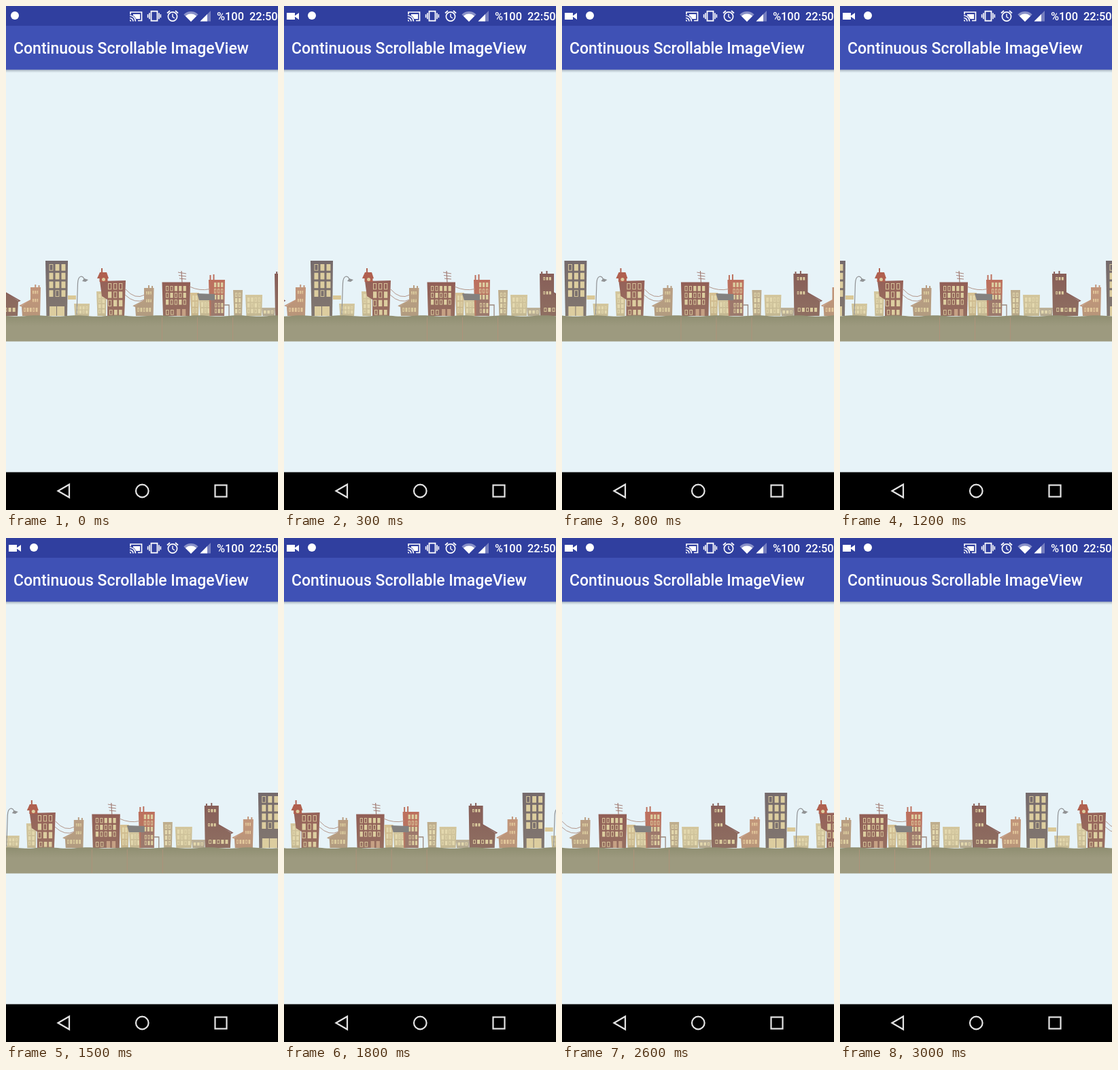
An HTML page with a canvas that plays this animation: 400 px wide and 740 px high, repeating every 3100 ms.

```html
<!DOCTYPE html>
<html lang="en">
<head>
<meta charset="utf-8">
<title>Continuous scroll</title>
<style>
html, body { margin: 0; width: 100%; height: 100%; overflow: hidden; background: #e7f3f8; }
canvas { display: block; }
</style>
</head>
<body>
<canvas id="stage" width="400" height="740"></canvas>
<script>
const ctx = document.getElementById('stage').getContext('2d');
const LOOP = 3100, STEP = 100, PERIOD = 416;
const STREET = 455;
const SKY = '#e7f3f8', CREAM = '#dccd9f', PALE = '#d4c79e', WIRE = '#b3978b', STEEL = '#909294';

// Scroll distance in pixels at a few times in ms; the speed is even in between
const SCROLL = [[0, 0], [300, 19], [1200, 83], [2300, 157], [3000, 201]];

function scrollAt(t) {
  const i = Math.max(1, SCROLL.findIndex(([time]) => time >= t));
  const [t0, d0] = SCROLL[i - 1], [t1, d1] = SCROLL[i];
  return d0 + (d1 - d0) * (t - t0) / (t1 - t0);
}

function rect(x, y, w, h, color) {
  ctx.fillStyle = color;
  ctx.fillRect(x, y, w, h);
}

function trace(...points) {
  ctx.beginPath();
  for (const [x, y] of points) ctx.lineTo(x, y);
}

function fill(color) {
  ctx.fillStyle = color;
  ctx.fill();
}

function stroke(color, width = 1) {
  ctx.strokeStyle = color;
  ctx.lineWidth = width;
  ctx.stroke();
}

function arc(x, y, r, from = 0, to = Math.PI * 2) {
  ctx.beginPath();
  ctx.arc(x, y, r, from, to);
}

function fade(y0, y1, color0, color1) {
  const gradient = ctx.createLinearGradient(0, y0, 0, y1);
  gradient.addColorStop(0, color0);
  gradient.addColorStop(1, color1);
  return gradient;
}

// Fills the current path and lets it pale towards the street
function wall(color, top) {
  fill(color);
  fill(fade(top, STREET, 'rgba(160,150,120,0)', 'rgba(160,150,120,.3)'));
}

// An even grid of windows, some lit and some only outlined
function panes(x, y, w, h, cols, rows, color = CREAM, seed = x) {
  const dx = w / cols, dy = h / rows, pw = dx * 0.66, ph = dy * 0.76;
  ctx.strokeStyle = color;
  ctx.lineWidth = 0.9;
  for (let i = 0; i < cols * rows; i++) {
    const px = x + i % cols * dx, py = y + Math.floor(i / cols) * dy;
    const noise = Math.abs(Math.sin(seed + i * 12.9898) * 43758.5453) % 1;
    if (noise < 0.62) rect(px, py, pw, ph, color);
    else ctx.strokeRect(px + 0.5, py + 0.5, pw - 1, ph - 1);
  }
}

// A block whose walls narrow slightly towards the street
function block(x, top, w, color) {
  trace([x, top], [x + w, top], [x + w - 1, STREET], [x + 1.5, STREET]);
  wall(color, top);
}

function annex(x, top, w, cols, rows, color = PALE) {
  block(x, top, w, color);
  panes(x + 3, top + 4, w - 4, STREET - top - 6, cols, rows, '#e3d8ae');
}

function chimneys(x, top, gap, h, color) {
  rect(x, top - h, 2, h, color);
  rect(x + gap, top - h - 1, 2, h + 1, color);
}

// A tower with a sloping wing on the side given by dir
function house(x, top, dir, towerW, wingW, color, glow = CREAM) {
  const h = STREET - top, w = towerW + wingW;
  const ridge = STREET - h * 0.55, eaves = STREET - h * 0.36;
  ctx.save();
  ctx.translate(x, 0);
  ctx.scale(dir, 1);
  trace([0, top], [towerW, top], [towerW, ridge], [w, eaves], [w - 1, STREET], [1, STREET]);
  wall(color, top);
  trace([towerW - 4, ridge - 2], [w + 2, eaves], [w, eaves + 1]);
  stroke(color, 1.6);
  chimneys(towerW * 0.1, top, towerW * 0.35, 3, color);
  panes(towerW * 0.25, top + 5, towerW * 0.62, 6, 3, 1, glow);
  panes(towerW * 0.25, ridge - 2, towerW * 0.62, 6, 3, 1, glow);
  panes(towerW * 0.3, STREET - 12, w * 0.78, 8, 5, 1, glow);
  ctx.restore();
}

function streetLamp(x) {
  trace([x, 453], [x + 1.5, 407]);
  ctx.bezierCurveTo(x + 2, 395, x + 9, 395, x + 11, 401);
  stroke(STEEL, 1.2);
  trace([x + 8, 404], [x + 11, 400], [x + 17, 402], [x + 13, 405]);
  fill(STEEL);
}

function tallBlock() {
  block(58, 374, 33, '#756a6c');
  panes(63.5, 379, 27, 51, 3, 4);
  rect(64, 441, 10, 14, CREAM);
  rect(75, 441, 11, 14, CREAM);
  rect(91, 425, 12, 6, '#dac896');
}

function clockBlock() {
  const color = '#956158', roof = '#b0604f';
  trace([138, 404], [176, 403], [174, STREET], [149, STREET], [149, 431], [141, 426]);
  wall(color, 403);
  rect(137.5, 398, 12, 7, roof);
  trace([134, 400], [138, 391], [148, 391], [151, 400]);
  fill(roof);
  rect(140, 385, 2, 7, roof);
  arc(143.5, 401.5, 2.5);
  fill(CREAM);
  panes(150, 407, 24, 37, 3, 3);
  panes(152, 446, 21, 10, 3, 1);
}

function brownBlock() {
  block(229.5, 405.5, 41.5, '#915e56');
  panes(235, 411, 32, 30, 5, 3);
  panes(235, 446, 14, 10, 2, 1);
  panes(251, 445, 16, 13, 2, 1, '#c6a184');
  trace([258, 389], [259, 406]);
  stroke('#9d736a', 1.1);
  for (let i = 0; i < 3; i++) {
    trace([253 + i, 391 + i * 4.5], [265, 393 + i * 4]);
    stroke('#9d736a', 0.9);
  }
}

function redBlock() {
  const color = '#bd705e';
  block(298, 402, 24, color);
  rect(301.5, 424, 19, 31, 'rgba(125,120,118,.45)');
  chimneys(299.5, 403, 5, 8, color);
  panes(306, 406, 15, 27, 3, 3);
  panes(307, 436, 14, 17, 3, 2);
  trace([281, 422], [307, 423], [307, 432], [284, 432]);
  fill('#83817f');
  trace([319, 439], [328, 439], [328, STREET]);
  stroke('#9a887c', 1.3);
}

function wire(x0, x1, y, sag) {
  trace([x0, y]);
  ctx.quadraticCurveTo((x0 + x1) / 2, y + sag, x1, y + sag / 2);
  stroke(WIRE);
}

function city() {
  house(51, 413, -1, 15, 13, '#c2957a', '#e2c79b');
  annex(100, 437, 23, 4, 2);
  annex(133, 419, 15, 2, 4);
  tallBlock();
  streetLamp(104);
  clockBlock();
  house(217.5, 414, -1, 14.5, 13, '#b99e83');
  wire(176, 204, 416, 16);
  wire(175, 204, 424, 14);
  brownBlock();
  annex(271, 421, 13, 2, 3, '#d6c193');
  annex(284, 431, 18, 3, 2);
  redBlock();
  wire(270, 300, 412, 7);
  annex(334, 417, 14, 2, 4, '#bfae8e');
  annex(352, 424, 25, 4, 3);
  annex(376, 443, 20, 3, 1, '#bcb199');
  house(395, 393, 1, 21, 18, '#875e58');
}

function ground(offset) {
  trace([0, 492.5]);
  for (let x = 0; x <= 400; x += 4) {
    ctx.lineTo(x, STREET + 0.8 * Math.sin((x + offset) * Math.PI * 14 / PERIOD));
  }
  ctx.lineTo(400, 492.5);
  fill(fade(STREET, 470, '#908f72', '#9d9a7f'));
  for (let i = 0; i < 3; i++) {
    rect((229 + i * 52 - offset + PERIOD) % PERIOD, 457, 1, 35, '#ad937a');
  }
}

function label(text, x, y, size) {
  ctx.font = `500 ${size}px Roboto, sans-serif`;
  ctx.fillStyle = '#fff';
  ctx.fillText(text, x, y);
}

function castIcon(x, y) {
  trace([x + 1, y - 10], [x + 1, y - 13.5], [x + 17.5, y - 13.5], [x + 17.5, y - 1], [x + 12, y - 1]);
  stroke('#fff', 1.7);
  rect(x + 5, y - 10.5, 10, 7, '#fff');
  arc(x, y, 10, -Math.PI / 2, 0);
  ctx.lineTo(x, y);
  fill('#303f9f');
  for (const r of [1.5, 5, 8.5]) {
    arc(x, y, r, -Math.PI / 2, 0);
    stroke('#fff', 1.7);
  }
}

function vibrateIcon(x, y) {
  ctx.lineWidth = 1.8;
  ctx.strokeStyle = '#fff';
  ctx.strokeRect(x - 4.5, y - 7, 9, 14);
  for (const side of [-1, 1]) {
    rect(x + side * 7 - 0.8, y - 4.5, 1.6, 9, '#fff');
    rect(x + side * 9.4 - 0.8, y - 2.5, 1.6, 5, '#fff');
  }
}

function alarmIcon(x, y) {
  arc(x, y, 6.6);
  stroke('#fff', 1.7);
  trace([x, y - 4], [x, y + 0.5], [x + 3, y + 2.5]);
  stroke('#fff', 1.4);
  for (const side of [-1, 1]) {
    trace([x + side * 8, y - 5], [x + side * 4, y - 8.5]);
    stroke('#fff', 1.7);
  }
}

function wifiFan(r, color) {
  arc(272, 23, r, -Math.PI * 0.75, -Math.PI * 0.25);
  ctx.lineTo(272, 23);
  fill(color);
}

function signalBar(right, color) {
  trace([right, 22.5 - (right - 285.5)], [right, 22.5], [285.5, 22.5]);
  fill(color);
}

function statusBar(recording) {
  rect(0, 0, 400, 29, '#303f9f');
  if (recording) {
    rect(4, 10, 12, 10, '#fff');
    trace([15, 15], [22, 10], [22, 20]);
    fill('#fff');
  }
  arc(recording ? 41 : 13, 14, 6);
  fill('#fff');
  castIcon(182, 22.5);
  vibrateIcon(218, 14.7);
  alarmIcon(245, 15.5);
  wifiFan(15, '#8991c8');
  wifiFan(11.5, '#fff');
  signalBar(301, '#7780bf');
  signalBar(296, '#fff');
  label('%100', 310, 21, 16.4);
  label('22:50', 358, 21, 16.4);
}

function toolbar() {
  rect(0, 93, 400, 5, fade(93, 98, 'rgba(60,70,90,.38)', 'rgba(60,70,90,0)'));
  rect(0, 29, 400, 64.5, '#3f51b5');
  label('Continuous Scrollable ImageView', 11, 70, 23);
}

function navigationBar() {
  rect(0, 684.5, 400, 55.5, '#000');
  trace([93, 702.5], [93, 721.5], [76.5, 712]);
  ctx.closePath();
  stroke('#e4e4e4', 2.2);
  arc(200.3, 712, 9.3);
  stroke('#e4e4e4', 2.2);
  ctx.strokeRect(307.5, 703.5, 17, 17);
}

function draw(now) {
  const t = Math.floor(now % LOOP / STEP) * STEP;
  const offset = scrollAt(t);
  rect(0, 0, 400, 740, SKY);
  for (let copy = -1; copy <= 1; copy++) {
    ctx.save();
    ctx.translate(copy * PERIOD - offset, 0);
    city();
    ctx.restore();
  }
  ground(offset);
  statusBar(t >= STEP);
  toolbar();
  navigationBar();
}

const start = performance.now();
function tick() {
  draw(performance.now() - start);
  requestAnimationFrame(tick);
}
tick();
</script>
</body>
</html>
```
